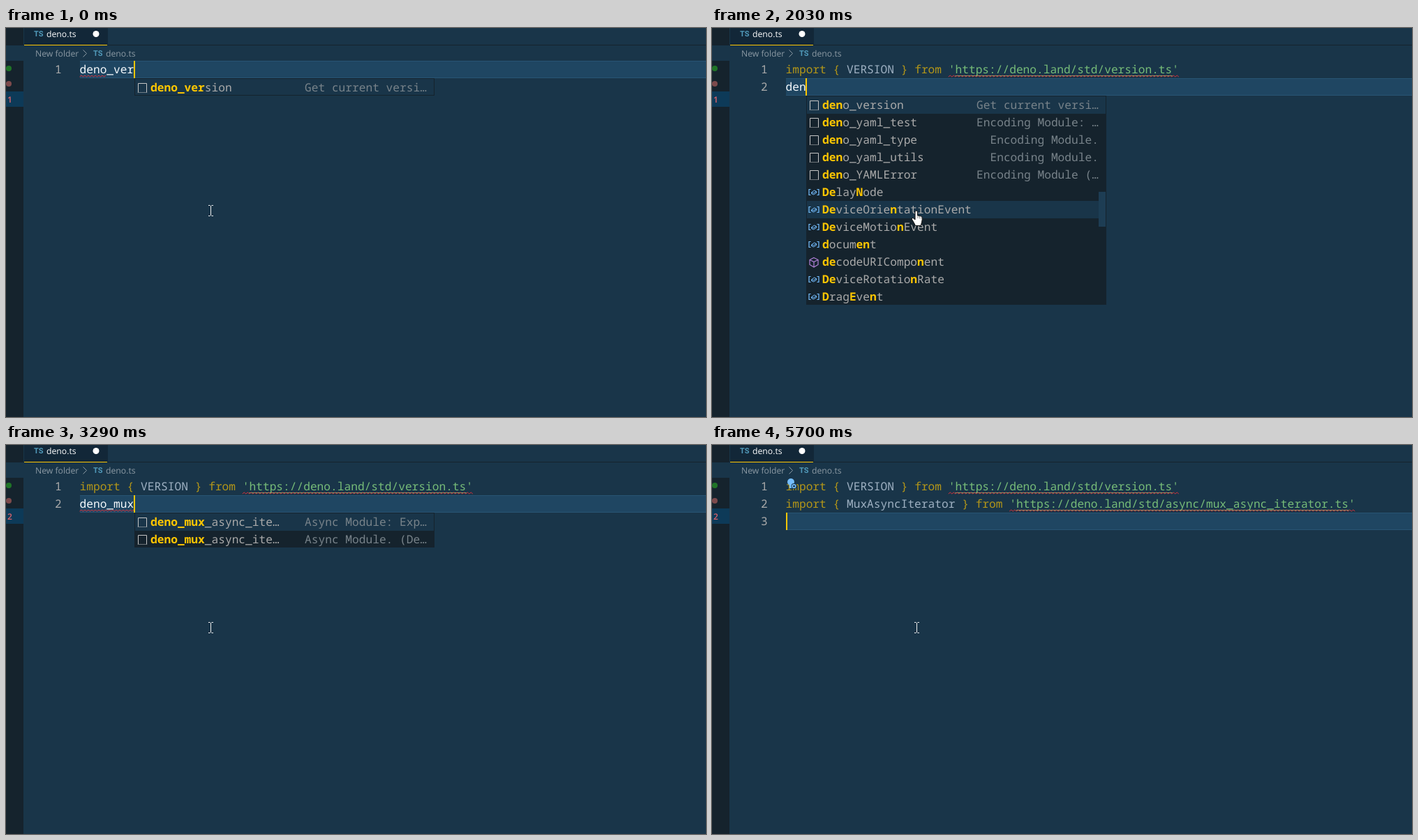
Animation of 1003 by 558 pixels, one loop 5790 ms. Source, as an HTML page with a canvas:

```html
<!DOCTYPE html>
<html lang="en">
<head>
<meta charset="utf-8">
<title>Editor snippets</title>
<style>
html, body { margin: 0; width: 100%; height: 100%; overflow: hidden; background: #193549; }
canvas { display: block; }
</style>
</head>
<body>
<canvas id="stage" width="1003" height="558"></canvas>
<script>
const c = document.getElementById('stage').getContext('2d');
const LOOP = 5790, CELL = 9.72, LEFT = 105.5, TOP = 47, ROW = 25;
const MONO = '16.2px "Noto Sans Mono", monospace', UI = '12.2px "Open Sans", sans-serif';
const BG = '#193549', DARK = '#15232d', YELLOW = '#ffc600', WHITE = '#f4f8fb', GREEN = '#a5ff90',
  PLAIN = '#e1efff', GREY = '#aaaaaa', BLUE = '#75beff', RED = '#d8323c';

// Each entry: [time, typed word]
const TYPED = [[0, 'deno_ver'], [150, ''], [1620, 'd'], [1730, 'de'], [2030, 'den'], [2190, 'deno'],
  [2510, 'deno_'], [2850, 'deno_m'], [3060, 'deno_mu'], [3290, 'deno_mux'], [3680, '']];
const MENUS = [[0, 'deno_ver'], [150, ''], [1670, 'd'], [1790, 'de'], [2030, 'den'], [2190, 'deno'],
  [2560, 'deno_'], [2910, 'deno_m'], [3060, 'deno_mu'], [3290, 'deno_mux'], [3680, '']];

const VERSION = ['deno_version', 'Get current versi…'];
const YAML = [['deno_yaml_test', 'Encoding Module: …'], ['deno_yaml_type', 'Encoding Module.'],
  ['deno_yaml_utils', 'Encoding Module.'], ['deno_YAMLError', 'Encoding Module (…']];
const MUX = [['deno_mux_async_ite…', 'Async Module: Exp…'], ['deno_mux_async_ite…', 'Async Module. (De…']];
const DOM = ['DelayNode', 'DeviceOrientationEvent', 'DeviceMotionEvent', 'document',
  'decodeURIComponent', 'DeviceRotationRate', 'DragEvent'].map(n => [n]);
const TAIL = [['deno_types', 'Encoding Module.'], ['deno_util', 'Datetime Module.'],
  ['deno_uuid', 'UUID Module.'], ['deno_v1', 'UUID Module.'], ['deno_v4', 'UUID Module.'], VERSION, ...YAML];
const TOML = ['deno_toml_test', 'Encoding Module: …'];
const START = { rows: [VERSION, ...YAML, ...DOM], thumb: [235, 50] };
const LISTS = {
  deno_ver: { rows: [VERSION] },
  d: START, de: START, den: START,
  deno: { rows: [...TAIL, ...DOM.slice(0, 2)], sel: 5, thumb: [346, 50] },
  deno_: { rows: [['deno_toml', 'Encoding Module.'], TOML, ...TAIL], sel: 7, thumb: [346, 50] },
  deno_m: { rows: [['deno_mod', 'Async Module: Exp…'], ...MUX, ['deno_Mark', 'Encoding Module (…'], TOML, ...YAML,
    ['deno_schema', 'Encoding Module. …'], ['deno_datetime', 'Datetime Module.'],
    ['deno_datetime_test', 'Datetime Module.']], thumb: [98, 275] },
  deno_mu: { rows: [...MUX, YAML[2]] },
  deno_mux: { rows: MUX }
};

const latest = (steps, t) => steps.filter(s => s[0] <= t).pop()[1];
const colX = n => LEFT + n * CELL;
const lineY = n => TOP + (n - 1) * ROW;

function rect(x, y, w, h, color) {
  c.fillStyle = color;
  c.fillRect(x, y, w, h);
}
function dot(x, y, r, color) {
  c.fillStyle = color;
  c.beginPath();
  c.arc(x, y, r, 0, 7);
  c.fill();
}
function stroke(d, color, width = 1) {
  c.strokeStyle = color;
  c.lineWidth = width;
  c.stroke(new Path2D(d));
}
function text(s, x, y, color, font = MONO) {
  c.font = font;
  c.fillStyle = color;
  c.fillText(s, x, y);
}
function squiggle(from, to, line) {
  const y = lineY(line) + 23;
  let d = `M${colX(from)} ${y}`;
  for (let x = colX(from), up = 1; x < colX(to) - 2; x += 2.5, up = !up) d += `l2.5 ${up ? -2 : 2}`;
  stroke(d, RED);
}
function caret(col, line) {
  rect(Math.max(106, Math.floor(colX(col))), lineY(line), 2, ROW, YELLOW);
}
function bulb(x) {
  dot(x + 5, 53, 5, BLUE);
  rect(x + 3, 57, 4, 5, BLUE);
  dot(x + 9.5, 59, 4, BG);
  c.strokeStyle = BLUE;
  c.lineWidth = 1.6;
  c.beginPath();
  c.arc(x + 9.5, 59, 2.3, 0, 7);
  c.stroke();
}

function importLine(line, name, path, { raw, braces = YELLOW, faded, link, error }) {
  const y = lineY(line) + 18, quote = name.length + 17, end = quote + path.length + 2;
  const put = (s, col, color) => text(s, colX(col), y, raw ? WHITE : color);
  c.globalAlpha = faded ? 0.667 : 1;
  put('import', 0, YELLOW);
  put('{', 7, braces);
  put(name, 9, PLAIN);
  put('}', 10 + name.length, braces);
  put('from', 12 + name.length, YELLOW);
  put(`'${path}'`, quote, GREEN);
  if (link) rect(colX(quote + 1), y + 3, path.length * CELL, 1, GREEN);
  c.globalAlpha = 1;
  if (error) squiggle(quote, end, line);
}

// Marks the letters of the query in order, ignoring case
function matched(name, query, x, y) {
  let k = 0;
  [...name].forEach((ch, i) => {
    const hit = k < query.length && ch.toLowerCase() === query[k];
    if (hit) k++;
    text(ch, x + i * CELL, y, hit ? YELLOW : GREY, (hit ? 'bold ' : '') + MONO);
  });
}
function icon(name, x, y) {
  if (name.startsWith('deno_')) {
    stroke(`M${x + 5.5} ${y + 19}V${y + 6.5}H${x + 17.5}V${y + 19}`, '#c5c5c5');
    for (let i = 0; i < 7; i++) rect(x + 5 + i * 2, y + 19, 1, 1, '#c5c5c5');
  } else if (name === 'decodeURIComponent') {
    stroke(`M${x + 11} ${y + 6.5}l6 3v7l-6 3.5l-6 -3.5v-7zM${x + 5} ${y + 9.5}l6 3l6 -3M${x + 11} ${y + 12.5}v7`, '#b180d7', 1.2);
  } else {
    stroke(`M${x + 6.5} ${y + 8.5}h-2.5v8h2.5M${x + 15.5} ${y + 8.5}h2.5v8h-2.5`, BLUE, 1.2);
    stroke(`M${x + 7.5} ${y + 13}l4 -3l3 1.5v2l-4 2.5l-3 -1.5zl3 1l4 -2.5`, BLUE);
  }
}
function menu(query, line) {
  const { rows, sel = 0, thumb } = LISTS[query];
  const x = Math.floor(colX(query.length)) + 1, top = lineY(line) + ROW, h = rows.length * ROW;
  rect(x, top, 430, h, DARK);
  rows.forEach(([name, detail], i) => {
    const y = top + 1 + i * ROW, hover = rows.length > 6 && i === 6;
    if (i === sel || hover) rect(x + 1, y, 428, ROW - (rows.length === 1 ? 2 : 0), BG);
    icon(name, x, y);
    matched(name, query, x + 23, y + 18);
    if (!detail) return;
    const start = x + 419 - detail.length * CELL, more = hover && query === 'deno_m';
    text(more ? 'Encoding Modu…' : detail, start, y + 18, '#78838a');
    if (more) stroke(`M${x + 404} ${y + 5.5}l4 4.5l-4 4.5`, '#c5c5c5', 1.2);
  });
  if (thumb) rect(x + 419, thumb[0], 10, thumb[1], '#1d3d54');
}

function pointer(hand) {
  if (!hand) {
    stroke('M290 254.5h2.5M294.5 254.5h2.5M290 269.5h2.5M294.5 269.5h2.5M293.5 255v14', '#f2f2f2');
    return;
  }
  const shape = new Path2D('M291 263q2 -2 3.5 0v6l5 1q2 .5 2 3l-1 6l-1.5 4.5h-7.5l-2 -4l-3 -5q-1 -2.5 1.5 -2l3 2.5z');
  c.fillStyle = '#fff';
  c.fill(shape);
  c.strokeStyle = '#111';
  c.lineWidth = 1;
  c.stroke(shape);
  stroke('M295 269v4M297.5 270v3.5M300 271v3', '#555', 0.7);
}

function chrome(t) {
  rect(0, 0, 1003, 558, BG);
  rect(0, 0, 25, 25, DARK);
  rect(0, 47, 25, 511, DARK);
  rect(0, 91, 25, 22, '#0d3a58');
  rect(25, 24, 978, 1, DARK);
  rect(26, 0, 120, 24, '#122738');
  rect(26, 24, 119, 1, YELLOW);
  dot(4, 58, 4, '#1f7427');
  dot(4, 80, 4, '#7d4a4c');
  text(t < 2610 ? '1' : '2', 2, 107, '#e0646c', '600 12px "Open Sans", sans-serif');
  const ts = 'bold 11px Roboto, sans-serif';
  text('TS', 40, 12, '#519aba', ts);
  text('deno.ts', 58, 13, '#fff', UI);
  dot(129, 8.5, 4.5, '#fff');
  text('New folder', 42, 41, '#8c9aa4', UI);
  stroke('M110.5 31.5l5 5l-5 5', '#8c9aa4');
  text('TS', 125, 40, '#519aba', ts);
  text('deno.ts', 143, 41, '#8c9aa4', UI);
}

function draw(t) {
  chrome(t);
  const typed = latest(TYPED, t), query = latest(MENUS, t);
  const line = t < 1150 ? 1 : t < 5700 ? 2 : 3;
  const selecting = t >= 3680 && t < 5400;
  if (!selecting) {
    const y = lineY(line);
    rect(106, y, 897, ROW, '#1f4662');
    rect(106, y, 897, 1, '#285473');
    rect(106, y + ROW - 1, 897, 1, '#285473');
  }
  for (let n = 1; n <= line; n++) text(n, 70, lineY(n) + 18, GREY);

  if (t >= 150) importLine(1, 'VERSION', 'https://deno.land/std/version.ts', {
    braces: t < 350 ? PLAIN : YELLOW, faded: t >= 490, error: t >= 580, link: t >= 670
  });
  if (t >= 3680) {
    if (selecting) {
      rect(colX(9), lineY(2), 16 * CELL, ROW, '#265b98');
      rect(921, lineY(2), 1, ROW + 1, '#66706f');
    }
    importLine(2, 'MuxAsyncIterator', 'https://deno.land/std/async/mux_async_iterator.ts', {
      raw: t < 3720, braces: t < 3940 ? PLAIN : YELLOW, faded: t >= 4040, error: t >= 4230, link: t >= 4230
    });
    if (t < 4040) squiggle(0, 8, 2);
    if (t >= 3940 && t < 5400) rect(colX(7), lineY(2) + 24, 20 * CELL, 1, '#8f7c22');
  }
  if (typed) {
    text(typed, LEFT, lineY(line) + 18, WHITE);
    const bad = t < 150 || (t >= 2610 && t < 2850) ? 4 : t >= 2850 ? typed.length : 0;
    if (bad) squiggle(0, bad, line);
  }
  if (t >= 760 && t < 1400) bulb(673);
  if (t >= 4330) bulb(108);

  const blinkOff = (t >= 670 && t < 1150) || (t >= 4150 && t < 4650) || (t >= 5150 && t < 5400);
  const col = typed ? typed.length : t < 1150 ? 58 : selecting ? 25 : t >= 5400 && t < 5700 ? 84 : 0;
  if (!blinkOff) caret(col, line);
  if (query) menu(query, line);
  pointer(query && LISTS[query].rows.length > 6);
}

c.textRendering = 'geometricPrecision';
const begin = performance.now();
function tick() {
  draw((performance.now() - begin) % LOOP);
  requestAnimationFrame(tick);
}
tick();
</script>
</body>
</html>
```
